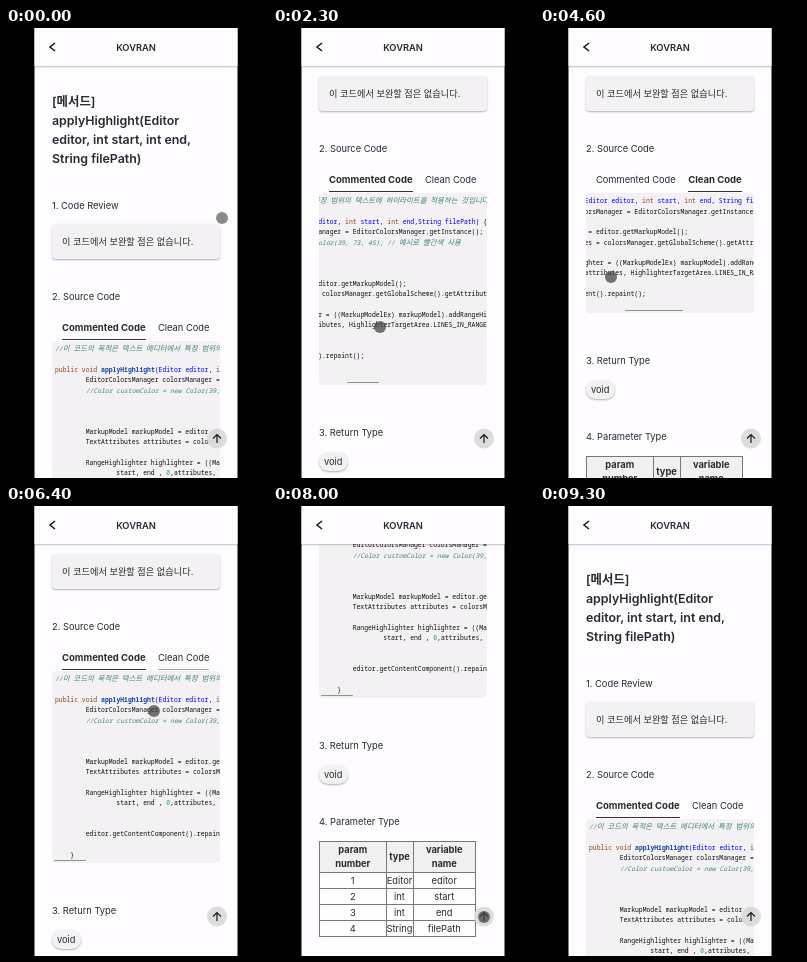
Recreate the animation shown at these times as an HTML page. Size 261 px wide and 450 px high, loop 9.8 s.

```html
<!DOCTYPE html>
<html>
<head>
<meta charset="utf-8">
<title>Method review</title>
<style>
html, body { margin: 0; width: 100%; height: 100%; overflow: hidden; background: #000; }
#phone { position: absolute; width: 261px; height: 450px; background: #fefcff; overflow: hidden;
  clip-path: inset(0 29.5px 0 28.5px); color: #2a2a2c;
  font: 9.3px/14px Inter, "Noto Sans CJK KR", "Noto Sans CJK", sans-serif; }
#page, #low { position: absolute; left: 0; top: 0; width: 261px; }
p, h1, pre, table, header, .box, .tabs, .bar, #dot, svg { position: absolute; margin: 0; white-space: nowrap; }
p { left: 46px; }
h1 { left: 46px; top: 63.5px; font-size: 12.4px; line-height: 19.3px; font-weight: 600; }
header { left: 28px; top: 0; width: 204px; height: 38px; background: #fefcff; text-align: center;
  line-height: 39px; font-weight: 600; box-shadow: 0 1px 1.5px rgba(0,0,0,.25); }
.box { left: 46px; width: 168px; background: #f3f1f3; border-radius: 4px; }
.raised { box-shadow: 0 1px 2px rgba(0,0,0,.3); }
.review { top: 196px; height: 35px; line-height: 35px; font-size: 9.2px; text-indent: 10px; }
.void { left: 45.5px; top: 572px; width: 29.5px; height: 19px; line-height: 19px; border-radius: 10px; text-align: center; }
.tabs { left: 56px; top: 293px; display: flex; gap: 12.5px; }
.tabs span { height: 18px; border-bottom: 1.2px solid transparent; }
.tabs .on { font-weight: 700; font-size: 9.5px; border-color: #333; }
.tabs .old { border-color: #aaa; }
#code { top: 313px; overflow: hidden; }
pre { left: 3px; top: 3.2px; white-space: pre; color: #111;
  font: 6.4px/10.33px "Noto Sans Mono", "DejaVu Sans Mono", monospace; }
pre b { font-weight: 400; color: #954121; }
pre em { font-style: normal; font-weight: 600; color: #19469d; }
pre u { text-decoration: none; color: #00f; }
pre s { text-decoration: none; color: #40a070; }
pre i { color: #408080; }
pre span { font: 7.4px/0 "Noto Sans CJK KR", "Noto Sans CJK", sans-serif; font-style: inherit; }
table { left: 46px; top: 648px; width: 157px; table-layout: fixed; border-collapse: collapse; text-align: center; }
th, td { padding: 0; border: 1px solid #777; }
th { height: 30px; line-height: 14.5px; background: #f1f0f1; font-weight: 700; }
td { height: 15px; line-height: 15px; }
.bar { background: rgba(0,0,0,.4); border-radius: 1px; }
#vbar { left: 228px; width: 1.5px; height: 261px; }
#hbar { height: 1px; }
#dot { left: -6px; top: -6px; width: 12px; height: 12px; border-radius: 50%; }
svg { left: 0; top: 0; fill: none; stroke: #1a1a1a; }
</style>
</head>
<body>
<div id="phone">
  <div id="page">
    <h1>[메서드]<br>applyHighlight(Editor<br>editor, int start, int end,<br>String filePath)</h1>
    <p style="top:171px">1. Code Review</p>
    <div class="box raised review">이 코드에서 보완할 점은 없습니다.</div>
    <p style="top:262px">2. Source Code</p>
    <div class="tabs"><span>Commented Code</span><span>Clean Code</span></div>
    <div class="box" id="code"><pre></pre><pre></pre><div class="bar" id="hbar"></div></div>
    <div id="low">
      <p style="top:546px">3. Return Type</p>
      <div class="box raised void">void</div>
      <p style="top:622px">4. Parameter Type</p>
      <table>
        <colgroup><col style="width:66.5px"><col style="width:27px"><col></colgroup>
        <tr><th>param<br>number<th>type<th>variable<br>name
        <tr><td>1<td>Editor<td>editor
        <tr><td>2<td>int<td>start
        <tr><td>3<td>int<td>end
        <tr><td>4<td>String<td>filePath
      </table>
    </div>
  </div>
  <header>KOVRAN</header>
  <div class="bar" id="vbar"></div>
  <svg width="261" height="450">
    <path d="M49 15L44 19L49 23" stroke-width="1.6"/>
    <circle cx="211" cy="410.5" r="10" fill="#dcdadc" fill-opacity=".95" stroke="none"/>
    <path d="M211 415V406.5M207 410.5L211 406.5L215 410.5" stroke-width="1.2"/>
  </svg>
  <div id="dot"></div>
</div>
<script>
const $ = s => document.querySelector(s), all = s => [...document.querySelectorAll(s)];
const tabs = all('.tabs span'), listings = all('pre');

const signature = gap => '<b>public</b> <b>void</b> <em>applyHighlight</em><u>(Editor editor, <b>int</b> start, ' +
  `<b>int</b> end,${gap}String filePath)</u> {`;
const manager = 'EditorColorsManager colorsManager = EditorColorsManager.getInstance();';
const model = 'MarkupModel markupModel = editor.getMarkupModel();';
const attrs = 'TextAttributes attributes = colorsManager.getGlobalScheme().getAttributes(EditorColors.SEARCH_RESULT_ATTRIBUTES);';
const range = 'RangeHighlighter highlighter = ((MarkupModelEx) markupModel).addRangeHighlighter(';
const area = 'attributes, HighlighterTargetArea.LINES_IN_RANGE);';
const repaint = 'editor.getContentComponent().repaint();';
const indent = (n, s) => ' '.repeat(n) + s;

const commented = [
  '<i>//이 코드의 목적은 텍스트 에디터에서 특정 범위의 텍스트에 하이라이트를 적용하는 것입니다.</i>', '',
  signature(''), indent(8, manager),
  indent(8, '<i>//Color customColor = new Color(39, 73, 45); // 예시로 빨간색 사용</i>'), '', '', '',
  indent(8, model), indent(8, attrs), '',
  indent(8, range), indent(16, 'start, end , <s>0</s>,' + area), '', '',
  indent(8, repaint), '', indent(4, '}')];
const clean = [
  signature(' '), indent(4, manager), '', indent(4, model), indent(4, attrs), '',
  indent(4, range), indent(12, 'start, end, <s>0</s>, ' + area), '', indent(4, repaint), '}'];
[commented, clean].forEach((lines, i) =>
  listings[i].innerHTML = lines.join('\n').replace(/[가-힣]+/g, '<span>$&</span>'));

// Smooth step from 0 to 1 between two times.
function ease(t, from, to) {
  const u = Math.min(1, Math.max(0, (t - from) / (to - from)));
  return u * u * (3 - 2 * u);
}
const scrollY = t => 148 * ease(t, 300, 1200) + 165 * ease(t, 6400, 7400) - 313 * ease(t, 8100, 9100);
const scrollX = t => 138 * (ease(t, 1300, 1900) - ease(t, 2300, 2900)) +
  108 * (ease(t, 3900, 4600) - ease(t, 4600, 5000));

// Pointer stops: time, x, y
const stops = [
  [0, 216, 190], [100, 211, 195], [300, 211, 195], [1300, 197, 253], [1900, 59, 262],
  [2300, 107, 299], [2800, 208, 290], [3200, 180, 154], [3500, 180, 154], [3900, 179, 249],
  [4600, 71, 249], [5100, 220, 247], [5600, 188, 284], [6200, 128, 160], [6400, 148, 205],
  [7700, 180, 403], [8000, 211, 411]];

function pointer(t) {
  const n = stops.findIndex(s => s[0] > t);
  if (n < 0) return stops.at(-1).slice(1);
  const [t0, x0, y0] = stops[n - 1], [t1, x1, y1] = stops[n], e = ease(t, t0, t1);
  return [x0 + (x1 - x0) * e, y0 + (y1 - y0) * e];
}
const within = (t, from, to) => t >= from && t < to;
const show = (el, on) => el.style.visibility = on ? 'visible' : 'hidden';

function draw(t) {
  const x = scrollX(t), y = scrollY(t), [px, py] = pointer(t);
  const tab = within(t, 3500, 6400) ? 1 : 0, height = tab ? 120 : 192;
  const switching = within(t, 3500, 3600) || within(t, 6400, 6500);

  $('#page').style.transform = `translateY(${-y}px)`;
  $('#low').style.transform = `translateY(${height - 192}px)`;
  $('#code').style.height = height + 'px';
  tabs.forEach((el, i) => el.className = i === tab ? 'on' : switching ? 'old' : '');
  listings.forEach((el, i) => {
    show(el, i === tab);
    el.style.transform = `translateX(${-x}px)`;
  });

  const h = $('#hbar');
  h.style.top = height - 3 + 'px';
  h.style.left = 2 + x * (tab ? .34 : .19) + 'px';
  h.style.width = (tab ? 58 : 32) + 'px';
  show(h, !within(t, 3300, 3500) && !within(t, 5500, 6400));

  const v = $('#vbar');
  v.style.top = 2 + y / 313 * 183 + 'px';
  show(v, within(t, 400, 1300) || within(t, 6500, 7700) || within(t, 8200, 9300));

  const dot = $('#dot');
  dot.style.transform = `translate(${px}px,${py}px)`;
  dot.style.background = t < 300 ? 'rgba(100,100,100,.74)' : 'rgba(70,70,70,.74)';
  show(dot, t < 8200);
}

function tick() {
  draw(Math.floor(performance.now() % 9800 / 100) * 100);
  requestAnimationFrame(tick);
}
tick();
</script>
</body>
</html>
```
